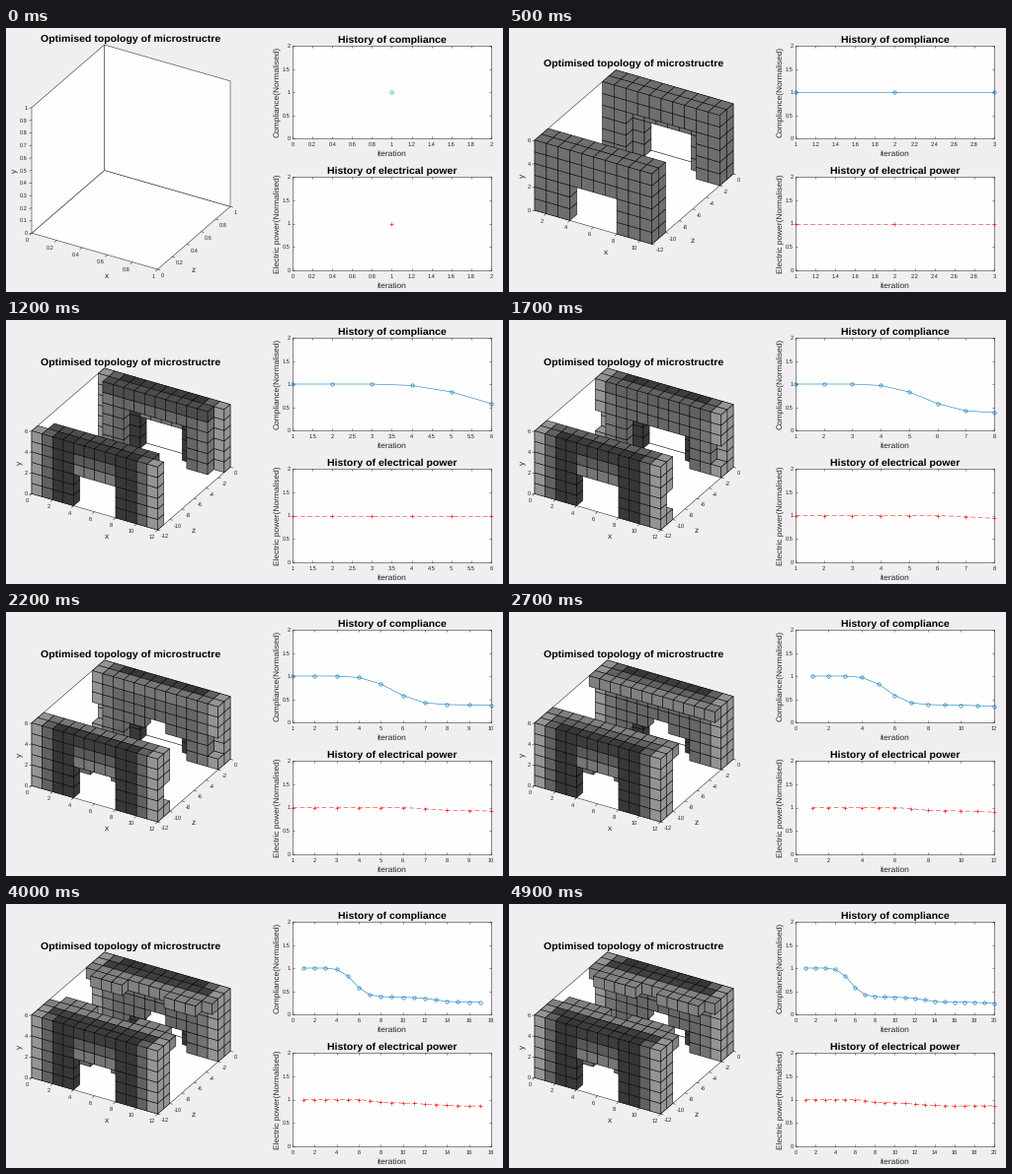
A matplotlib script that plays this animation: 503 by 268 pixels, repeating every 5 s.

```python
import math
from itertools import product

import matplotlib.pyplot as plt
from matplotlib.animation import FuncAnimation
from matplotlib.collections import LineCollection, PolyCollection

W, H, DPI = 503, 268, 100
FRAMES, STEP = 50, 100
BG, PANE, INK = "#f0eef0", "#fefefe", "#262626"
BLUE, TEAL, RED = "#0072bd", "#2a9d8a", "#f01818"
PX = 72 / DPI
TICK, LABEL, TITLE = 5.7 * PX, 8.4 * PX, 10.5 * PX
THIN = .38

COMPLIANCE = [1, 1, 1, .97, .83, .58, .42, .385, .375, .37,
              .36, .345, .31, .28, .27, .265, .26, .258, .25, .24]
POWER = [1, 1, 1, 1, 1, 1, .975, .94, .935, .925,
         .92, .9, .89, .875, .865, .86, .865, .865, .865, .865]

# Grey levels counted from the outer column to the middle one
OUTER = [.58, .38, .21, .22, .24, .24]
INNER = [.58, .45, .4, .4, .4, .4]

plt.rcParams.update({"font.family": "Liberation Sans", "text.hinting": "none"})
fig = plt.figure(figsize=(W / DPI, H / DPI), dpi=DPI, facecolor=BG)
ax = fig.add_axes([0, 0, 1, 1])


def text(x, y, s, size, **kw):
    kw = {"ha": "center", "va": "baseline", "color": INK, **kw}
    ax.text(x, y, s, fontsize=size, **kw)


def title(x, y, s):
    text(x, y, s, TITLE, weight="bold", color="black")


def lines(segments):
    ax.add_collection(LineCollection(segments, colors=INK, linewidths=THIN))


def steps(lo, hi, step):
    first = math.ceil(lo / step - 1e-9)
    last = math.floor(hi / step + 1e-9)
    return [round(i * step, 3) for i in range(first, last + 1)]


# ---- microstructure -------------------------------------------------

def solid(n, x, y, z):
    """Is the cell filled at iteration n? Both halves mirror each other."""
    u, w = min(x, 11 - x), min(z, 11 - z)
    if w == 0:
        return (u >= 1 or n >= 5) and (u <= 3 or y >= 3)
    if w == 1:
        if u == 0:
            return n >= 12 or n >= 8 and y not in (1, 2)
        if u <= 2:
            return True
        arch = 4 if n < 8 else 3 if n < 10 or u == 5 else 2
        return y >= arch
    if w == 2:
        return n >= 12 and y == 5
    if w == 3 and y == 5:
        low, high = (2 if n < 16 else 1), (3 if n < 19 else 4)
        return n >= 13 and low <= u <= high
    return False


def grey(n, x, y, z):
    u, w = min(x, 11 - x), min(z, 11 - z)
    if w == 0:
        end = OUTER[u]
        if u >= 4:
            end += .11 * (5 - y)
    elif w == 1:
        end = INNER[u]
        if y == 5 and u > 0:
            end = max(.25, .46 - .04 * abs(n - 10))
    else:
        end = .5
    if u == 0:
        return end
    blend = min(1, max(0, (n - 3) / 3))
    return .43 + (end - .43) * blend


def view(x_lim, y_lim, z_lim):
    """Orthographic view, azimuth 30 and elevation 30, fitted in width."""
    c = math.cos(math.pi / 6)
    scale = 201 / (c * (x_lim[1] - x_lim[0]) + .5 * (z_lim[1] - z_lim[0]))
    mid = [sum(lim) / 2 for lim in (x_lim, y_lim, z_lim)]

    def point(x, y, z):
        x, y, z = x - mid[0], y - mid[1], z - mid[2]
        return (126.5 + scale * (c * x + .5 * z),
                131 + scale * (.25 * x - c * z / 2 - c * y))
    return point


def voxels(n, point):
    cells = [c for c in product(range(12), range(6), range(12)) if solid(n, *c)]
    filled = set(cells)
    cells.sort(key=lambda c: .433 * c[0] - .75 * c[2] + .5 * c[1])
    faces, colors = [], []
    for x, y, z in cells:
        a, b, d, e = x + 1, y + 1, z - 12, z - 11
        sides = {
            (x, y + 1, z): [(x, b, d), (a, b, d), (a, b, e), (x, b, e)],
            (x, y, z - 1): [(x, y, d), (a, y, d), (a, b, d), (x, b, d)],
            (x + 1, y, z): [(a, y, d), (a, y, e), (a, b, e), (a, b, d)],
        }
        for neighbour, corners in sides.items():
            if neighbour not in filled:
                faces.append([point(*p) for p in corners])
                colors.append((grey(n, x, y, z),) * 3)
    ax.add_collection(PolyCollection(faces, facecolors=colors,
                                     edgecolors="black", linewidths=THIN))


def draw_structure(n):
    if n == 1:
        xl, yl, zl = (0, 1), (0, 1), (0, 1)
        dx, dy = .2, .1
    else:
        xl, yl, zl = (1, 11) if n < 5 else (0, 12), (0, 6), (-12, 0)
        dx, dy = 2, 2
    point = view(xl, yl, zl)
    (x0, x1), (y0, y1), (z0, z1) = xl, yl, zl

    floor = [(x0, y0, z0), (x1, y0, z0), (x1, y0, z1), (x0, y0, z1)]
    back = [(x0, y0, z1), (x1, y0, z1), (x1, y1, z1), (x0, y1, z1)]
    left = [(x0, y0, z0), (x0, y0, z1), (x0, y1, z1), (x0, y1, z0)]
    ax.add_collection(PolyCollection([[point(*p) for p in q] for q in (floor, back, left)],
                                     facecolors=PANE, edgecolors=INK, linewidths=THIN))
    ticks = []
    for v in steps(*xl, dx):
        px, py = point(v, y0, z0)
        ticks.append([(px, py), (px - 2.3, py + 2)])
        text(px - 2.7, py + 9, f"{v:g}", TICK, ha="right")
    for v in steps(*zl, dx):
        px, py = point(x1, y0, v)
        ticks.append([(px, py), (px + 2.8, py + .8)])
        text(px + 3.6, py + 8, f"{v:g}", TICK, ha="left")
    for v in steps(*yl, dy):
        px, py = point(x0, v, z0)
        ticks.append([(px, py), (px - 2.5, py + .7)])
        text(px - 4, py + 2, f"{v:g}", TICK, ha="right")
    lines(ticks)

    if n > 1:
        voxels(n, point)

    mx, my = point((x0 + x1) / 2, y0, z0)
    text(mx + 12.5, my + 27.5, "x", LABEL)
    mx, my = point(x1, y0, (z0 + z1) / 2)
    text(mx, my + 34.5, "z", LABEL)
    my = point(x0, (y0 + y1) / 2, z0)[1]
    text(8 if n == 1 else 13, my, "y", LABEL, rotation=90, va="center")
    title(126.5, point(x0, y1, z1)[1] - 3.5, "Optimised topology of microstructre")


# ---- history plots --------------------------------------------------

def x_scale(n):
    """Limits and tick step of the iteration axis."""
    if n == 1:
        return 0, 2, .2
    if n < 12:
        return 1, n, .1 if n == 2 else .2 if n == 3 else .5 if n < 7 else 1
    return 0, n + n % 2, 2


def draw_history(n, top, bottom, name, label, values, style):
    x0, x1 = 290, 491
    lo, hi, step = x_scale(n)

    def to_x(v):
        return x0 + (x1 - x0) * (v - lo) / (hi - lo)

    def to_y(v):
        return bottom - (bottom - top) * v / 2

    ax.add_patch(plt.Rectangle((x0, top), x1 - x0, bottom - top,
                               facecolor=PANE, edgecolor=INK, linewidth=THIN))
    ticks = []
    for v in steps(lo, hi, step):
        x = to_x(v)
        ticks += [[(x, bottom), (x, bottom - 2)], [(x, top), (x, top + 2)]]
        text(x, bottom + 8, f"{v:g}", TICK)
    for v in steps(0, 2, .5):
        y = to_y(v)
        ticks += [[(x0, y), (x0 + 2, y)], [(x1, y), (x1 - 2, y)]]
        text(x0 - 2.5, y + 2, f"{v:g}", TICK, ha="right")
    lines(ticks)

    ax.plot([to_x(i + 1) for i in range(n)], [to_y(v) for v in values[:n]],
            linewidth=THIN, markeredgewidth=.45, markerfacecolor="none", **style)
    title(390.5, top - 3.5, name)
    text(390.5, bottom + 18.3, "iteration", LABEL)
    text(275, (top + bottom) / 2, label, LABEL, rotation=90, va="center")


def draw(frame):
    t = frame * STEP
    shape = 1 if t < 200 else min(20, 1 + (t + 200) // 250)
    n = min(20 if t >= 4800 else 19, 1 + (t + 50) // 250)

    ax.clear()
    ax.set(xlim=(0, W), ylim=(H, 0))
    ax.axis("off")
    draw_structure(shape)
    draw_history(n, 18, 112, "History of compliance", "Compliance(Normalised)", COMPLIANCE,
                 dict(color=TEAL if n == 1 else BLUE, marker="o", markersize=2.4))
    draw_history(n, 151, 246, "History of electrical power", "Electric power(Normalised)", POWER,
                 dict(color=RED, marker="+", markersize=2.2, linestyle=(0, (9, 5))))
    return []


anim = FuncAnimation(fig, draw, frames=FRAMES, interval=STEP,
                     init_func=lambda: [], repeat=True, repeat_delay=0)
plt.show()
```
